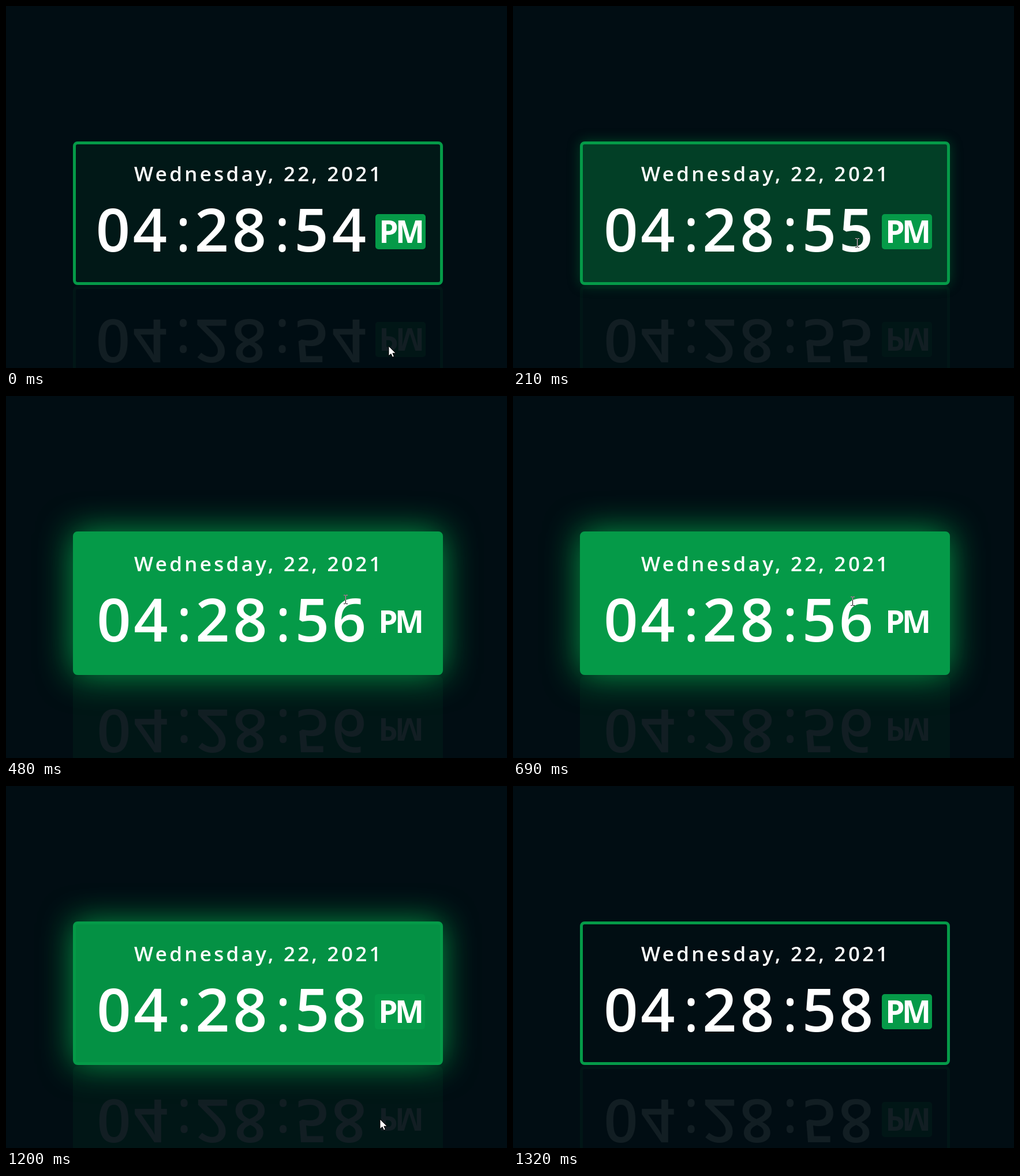
These frames come from a looping animation (868 by 628 pixels, 1.35 s). An HTML page:

```html
<!DOCTYPE html>
<html lang="en">
<head>
<meta charset="utf-8">
<title>Digital clock</title>
<style>
  :root { --green: rgb(5, 154, 72); --fill: 0; }
  html, body { margin: 0; width: 100%; height: 100%; overflow: hidden; background: #010d13; }
  .stage { position: relative; width: 100%; height: 100%; overflow: clip; isolation: isolate; background: #010d13; }
  .card {
    position: absolute; left: 116px; top: 235px; width: 641px; height: 249px;
    box-sizing: border-box; border: 5px solid var(--green); border-radius: 8px;
    background: rgba(5, 154, 72, var(--fill));
    box-shadow: 0 0 calc(60px * var(--fill)) rgba(5, 154, 72, var(--fill));
  }
  .card svg { display: block; overflow: visible; }
  .mirror { top: 486px; transform: scaleY(-1); opacity: .065; box-shadow: none; }
  text { fill: #fff; font-family: "Open Sans", "Noto Sans", sans-serif; font-weight: 600; }
  .date { font-size: 35px; letter-spacing: 4.3px; }
  .time { font-size: 104px; text-anchor: middle; }
  .colon { font-weight: 400; }
  .badge rect { fill: var(--green); }
  .badge text { font-size: 53px; font-weight: 700; text-anchor: middle; }
  .cursor { position: absolute; left: 0; top: 0; overflow: visible; pointer-events: none; }
  #beam { mix-blend-mode: difference; }
</style>
</head>
<body>
<div class="stage">
  <div class="card">
    <svg width="631" height="239" viewBox="121 240 631 239">
      <text class="date" x="222" y="304">Wednesday, 22, 2021</text>
      <g class="time">
        <g class="lead">
          <text x="187" y="426">0</text><text x="251" y="426">4</text>
          <text class="colon" x="308.5" y="426">:</text>
          <text x="358" y="426">2</text><text x="423" y="426">8</text>
          <text class="colon" x="480" y="426">:</text>
          <text x="530.5" y="426">5</text>
        </g>
        <text class="unit" x="594.5" y="426">4</text>
      </g>
      <g class="badge">
        <rect x="639" y="361" width="87" height="61" rx="5"/>
        <text x="662" y="411">P</text><text x="699" y="411">M</text>
      </g>
    </svg>
  </div>
  <svg class="cursor" id="arrow" width="1" height="1">
    <path d="M0 0V17L4 13.4 6.6 19.3 9.4 18 6.9 12.3H12.2Z" fill="#fff" stroke="#000"/>
  </svg>
  <svg class="cursor" id="beam" width="1" height="1">
    <path d="M-3 -7.5H0M1 -7.5H4M.5 -7V7M-3 7.5H0M1 7.5H4" fill="none" stroke="#fff"/>
  </svg>
</div>
<script>
const LOOP = 1350, STEP = 30, FADE = 140;
const TICKS = [120, 453, 787, 1120];
const HOVER = { lastOut: -92, enter: 178, leave: 1189 };
const HIDE = 1230;
const TEXT_BOTTOM = 430;

// time, x, y
const PATH = [
  [0, 663, 590], [60, 652, 560], [120, 622, 488], [210, 596, 411],
  [270, 588, 350], [690, 588, 356], [870, 592, 292], [990, 592, 300],
  [1110, 606, 400], [1170, 634, 520], [1200, 648, 578], [1230, 660, 620]
];

const $ = id => document.getElementById(id);
const all = name => document.querySelectorAll(name);
const card = document.querySelector('.card');
const mirror = card.cloneNode(true);
mirror.classList.add('mirror');
mirror.setAttribute('aria-hidden', 'true');
card.after(mirror);

// cubic-bezier(.25, .1, .25, 1)
function ease(x) {
  if (x <= 0) return 0;
  if (x >= 1) return 1;
  const curve = (a, b, u) => 3 * a * u * (1 - u) ** 2 + 3 * b * u * u * (1 - u) + u ** 3;
  let lo = 0, hi = 1;
  for (let i = 0; i < 24; i++) {
    const mid = (lo + hi) / 2;
    if (curve(.25, .25, mid) < x) lo = mid; else hi = mid;
  }
  return curve(.1, 1, lo);
}

function hoverAt(t) {
  const fade = start => ease((t - start) / FADE);
  if (t < HOVER.enter) return 1 - fade(HOVER.lastOut);
  return t < HOVER.leave ? fade(HOVER.enter) : 1 - fade(HOVER.leave);
}

function pointAt(t) {
  const i = Math.max(1, PATH.findIndex(p => p[0] >= t));
  const [t0, x0, y0] = PATH[i - 1], [t1, x1, y1] = PATH[i];
  const k = (t - t0) / (t1 - t0);
  return [x0 + (x1 - x0) * k, y0 + (y1 - y0) * k].map(Math.round);
}

function place(el, shown, x, y) {
  el.style.display = shown ? 'block' : 'none';
  el.style.transform = `translate(${x}px, ${y}px)`;
}

function shift(name, x) {
  all(name).forEach(el => el.setAttribute('transform', `translate(${x} 0)`));
}

function draw(t) {
  document.documentElement.style.setProperty('--fill', hoverAt(t).toFixed(4));

  const unit = 4 + TICKS.filter(tick => t >= tick).length;
  all('.unit').forEach(el => el.textContent = unit);
  // the row is centred, so wider or narrower digits nudge both ends
  shift('.lead', unit === 4 ? -1.5 : unit === 7 ? 1 : 0);
  shift('.badge', unit === 4 ? 1 : unit === 7 ? -1 : 0);

  const visible = t < HIDE;
  const [x, y] = visible ? pointAt(t) : [0, 0];
  const onText = y < TEXT_BOTTOM;
  place($('arrow'), visible && !onText, x, y);
  place($('beam'), visible && onText, x, y);
}

const start = performance.now();
function frame() {
  const t = (performance.now() - start) % LOOP;
  draw(Math.floor(t / STEP) * STEP);
  requestAnimationFrame(frame);
}
frame();
</script>
</body>
</html>
```
